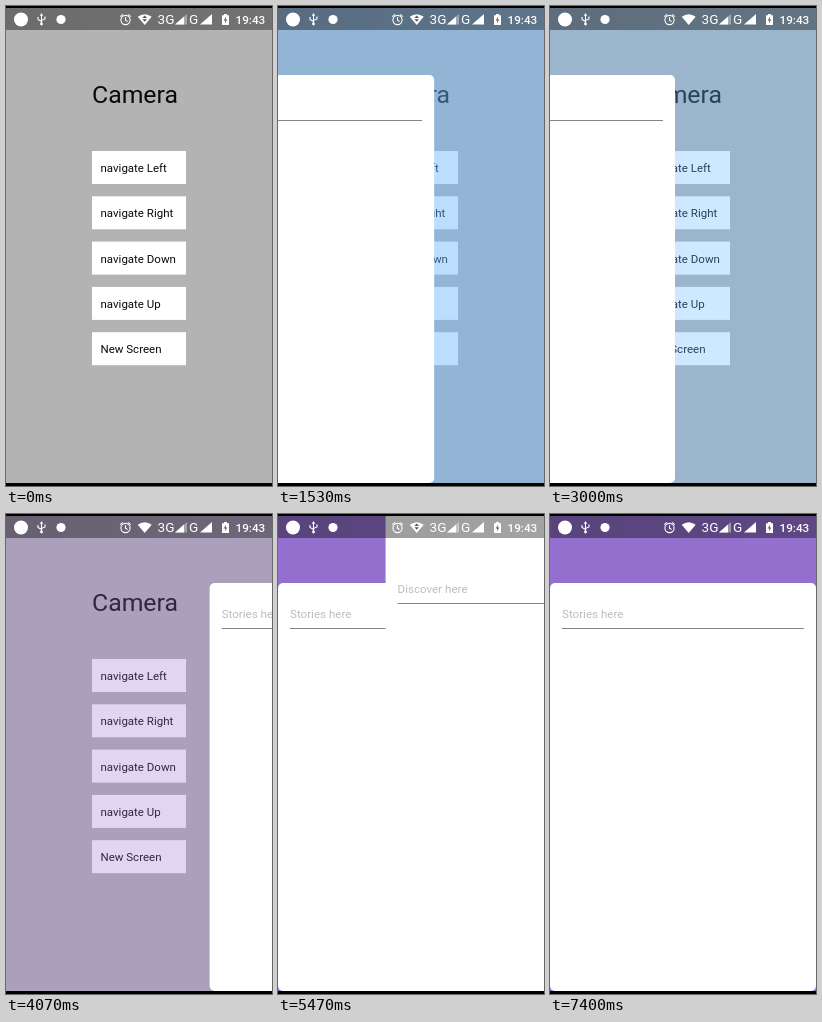
An HTML page for the animation above (8 s loop, 266 by 480 pixels).

```html
<!DOCTYPE html>
<html lang="en">
<head>
<meta charset="utf-8">
<title>Swipe navigation</title>
<style>
  html, body { margin: 0; width: 100%; height: 100%; overflow: hidden; background: #000; }
  svg { display: block; width: 100vw; height: 100vh; }
  text { font-family: Roboto, "Noto Sans", sans-serif; }
  .label { font-size: 11.5px; fill: #0a0a0a; }
  .hint { font-size: 11.6px; fill: #bdbdbd; }
  .rule { fill: #858585; }
  .net { font-size: 13.6px; }
</style>
</head>
<body>
<svg viewBox="0 0 266 480">
  <defs>
    <linearGradient id="shade">
      <stop offset="0" stop-opacity=".4"/>
      <stop offset="1" stop-opacity=".36"/>
    </linearGradient>
  </defs>

  <rect width="266" height="480" fill="#b3b3b3"/>
  <text x="86" y="96.5" font-size="24.8" fill="#0a0a0a">Camera</text>
  <g id="buttons"></g>
  <rect id="tint" width="266" height="480"/>

  <g id="chat">
    <rect y="69" width="266" height="408" rx="5" fill="#fff"/>
    <text class="hint" x="12" y="103.5">Chat here</text>
    <rect class="rule" x="12" y="114" width="242" height="1"/>
  </g>
  <g id="stories">
    <rect y="69" width="266" height="408" rx="5" fill="#fff"/>
    <text class="hint" x="12" y="103.5">Stories here</text>
    <rect class="rule" x="12" y="114" width="242" height="1"/>
  </g>
  <g id="discover">
    <rect width="266" height="480" fill="#fff"/>
    <text class="hint" x="12" y="78.5">Discover here</text>
    <rect class="rule" x="12" y="89" width="242" height="1"/>
  </g>

  <rect width="266" height="24" fill="url(#shade)"/>
  <g fill="#fff">
    <circle cx="15" cy="13.5" r="7"/>
    <g fill="none" stroke="#fff" stroke-width="1.1">
      <path d="M35.5 9V18M32 11V13.5L35.5 15.5M39 10.5V13L35.5 14.5"/>
      <circle cx="119.5" cy="14" r="4.6"/>
      <path d="M119.5 11.3V14.3L121.6 15.5M114.2 10.6L117 8.3M124.8 10.6L122 8.3"/>
    </g>
    <path d="M35.5 7L37.2 9.8H33.8Z"/>
    <circle cx="35.5" cy="18" r="1.4"/>
    <circle cx="55" cy="13.5" r="4.6"/>
    <path d="M131.7 10.8Q138.7 5.8 145.7 10.8L138.7 19Z"/>
    <path id="traffic" d="M138.7 9.6L141 12H136.4ZM138.7 15.8L141 13.2H136.4Z" fill="#555"/>
    <text class="net" x="151.5" y="18.3">3G</text>
    <path d="M181 8V18.5H169Z" fill-opacity=".4"/>
    <path d="M178 10.6V18.5H169Z"/>
    <text class="net" x="183" y="18.3">G</text>
    <path d="M206 8V18.5H194Z"/>
    <path d="M218 8H221V9.2H223V19H216V9.2H218Z"/>
    <path d="M220.2 10.5L217.6 14.6H219.3L218.8 17.6L221.4 13.4H219.7Z" fill="#666"/>
    <text x="229.5" y="18" font-size="11.7" font-weight="500">19:43</text>
  </g>
  <rect width="266" height="2"/>
  <rect y="477" width="266" height="3"/>
</svg>

<script>
const LOOP = 8000, FPS = 15, W = 266;
const BLUE = "rgb(104,182,255)", PURPLE = "rgb(147,112,205)";
const $ = id => document.getElementById(id);

const labels = ["navigate Left", "navigate Right", "navigate Down", "navigate Up", "New Screen"];
$("buttons").innerHTML = labels.map((label, i) => {
  const y = 145 + i * 45.3;
  return `<rect x="86" y="${y}" width="94" height="33" fill="#fff"/>
    <text class="label" x="94.5" y="${y + 21}">${label}</text>`;
}).join("");

// Critically damped approach from 0 to 1.
function spring(t, start, rate) {
  const x = Math.max(0, t - start) / 1000 * rate;
  return 1 - (1 + x) * Math.exp(-x);
}

// Linear interpolation through [time, value] pairs.
function track(t, keys) {
  if (t <= keys[0][0]) return keys[0][1];
  for (let i = 1; i < keys.length; i++) {
    const [t0, v0] = keys[i - 1], [t1, v1] = keys[i];
    if (t <= t1) return v0 + (v1 - v0) * (t - t0) / (t1 - t0);
  }
  return keys[keys.length - 1][1];
}

const chatOut = [[2535, 266], [2670, 246], [2800, 210], [3000, 125], [3130, 62], [3230, 22], [3333, 0]];
const discoverPath = [
  [4935, 266], [5130, 232], [5330, 172], [5470, 106], [5600, 58], [5730, 24], [5800, 13], [5900, 4], [6000, 0],
  [6335, 0], [6600, 38], [6800, 88], [7000, 152], [7200, 216], [7300, 252], [7400, 266]
];

function chatEdge(t) {
  if (t < 2125) return W * spring(t, 1321, 9.3);
  return track(t, chatOut);
}

const storiesOpen = t => t > 4725 ? 1 : spring(t, 3980, 10.6);

const trafficOn = t =>
  t < 395 || (t > 1325 && t < 2395) || (t > 4330 && t < 6600);

const slide = (id, x) => $(id).setAttribute("transform", `translate(${x.toFixed(2)} 0)`);

function draw(t) {
  const edge = chatEdge(t), open = storiesOpen(t);
  slide("chat", edge - W);
  slide("stories", W * (1 - open));
  slide("discover", track(t, discoverPath));
  const left = edge > 0;
  $("tint").setAttribute("fill", left ? BLUE : PURPLE);
  $("tint").setAttribute("opacity", left ? (edge / W) ** 1.5 : Math.min(1, open * 1.2));
  $("traffic").setAttribute("visibility", trafficOn(t) ? "visible" : "hidden");
}

const begin = performance.now();
function tick() {
  const t = (performance.now() - begin) % LOOP;
  draw(Math.floor((t + 5) * FPS / 1000) * 1000 / FPS % LOOP);
  requestAnimationFrame(tick);
}
tick();
</script>
</body>
</html>
```
